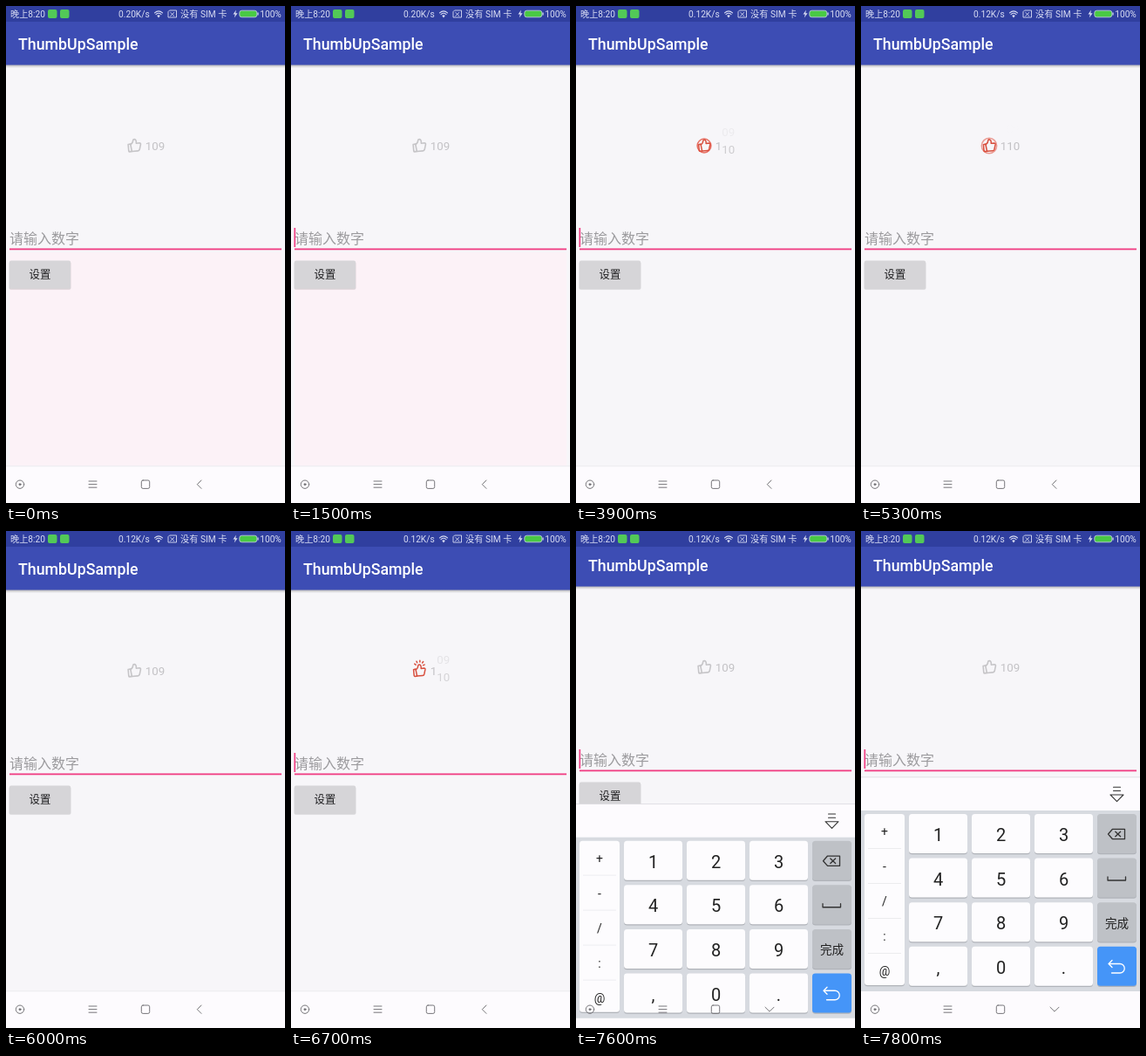
Write an HTML page that moves like this. It is 320 px wide and 569 px high and loops after 8 s.

```html
<!DOCTYPE html>
<html lang="zh">
<head>
<meta charset="utf-8">
<style>
  html, body { margin: 0; width: 100%; height: 100%; overflow: hidden; background: #f7f6f9; }
  svg { display: block; width: 100%; height: 100%; }
  text { font-family: Roboto, "Noto Sans CJK SC", "Noto Sans CJK", sans-serif; }
  .line { fill: none; stroke-linecap: round; stroke-linejoin: round; }
  .mid { text-anchor: middle; }
</style>
</head>
<body>
<svg viewBox="0 0 320 569">
  <defs>
    <linearGradient id="shade" x2="0" y2="1">
      <stop stop-color="#000" stop-opacity=".28"/>
      <stop offset="1" stop-color="#000" stop-opacity="0"/>
    </linearGradient>
    <clipPath id="ringClip"><circle id="clipDisc" cx="147" cy="160" r="9"/></clipPath>
    <g id="hand">
      <path d="M-6.9-1.4L-4.3-2.1L-2.6 6.4L-5 6.9Q-6 7-6.2 6Z"/>
      <path d="M-4.2-1.5Q-1.4-3-1.4-6Q-1.2-7.6.4-7.4Q2.7-7 2.3-2.8L6-3.2Q7.7-3.1 7.4-1.4L6.2 4.3Q5.8 5.8 4.3 5.9L-2.7 6.5"/>
    </g>
  </defs>

  <rect width="320" height="569" fill="#f7f6f9"/>
  <rect id="tint" x="4" y="282" width="312" height="244" fill="#fcf2f7"/>

  <g id="app">
    <rect y="67" width="320" height="4" fill="url(#shade)"/>
    <rect y="10" width="320" height="57.5" fill="#3d4db4"/>
    <text x="14" y="49.5" font-size="17.8" font-weight="500" fill="#fff">ThumbUpSample</text>

    <g id="thumb" class="line" stroke-width="1.6">
      <use href="#hand"/>
      <path id="rays" d="M-5.6-8.4L-4.2-7.3M-3.3-11.6L-2.5-9.9M.9-12.6V-10.7M5-11.2L3.9-9.6M6.6-7.4L5-6.8"/>
    </g>
    <circle id="ring" class="line" cx="147" cy="160" stroke="#e24d3d" stroke-width="1.5"/>
    <g font-size="13.3" fill="#c3c2c5">
      <text x="159.7" y="165">1</text>
      <text id="low" x="167.2">09</text>
      <text id="high" x="167.2">10</text>
    </g>

    <text x="4" y="272" font-size="16" fill="#9c9b9e">请输入数字</text>
    <rect x="4" y="277.5" width="312" height="1.8" fill="#f03c82"/>
    <rect id="cursor" x="3.5" y="254" width="1.7" height="22" fill="#f03c82"/>

    <rect x="3.5" y="292.5" width="71" height="32.3" rx="2" fill="#000" opacity=".13"/>
    <rect x="4" y="291.5" width="70" height="32" rx="1.6" fill="#d6d5d8"/>
    <text class="mid" x="39" y="311.8" font-size="12.4" fill="#1c1c1e">设置</text>
  </g>

  <rect width="320" height="18" fill="#303f9f"/>
  <g font-size="10.2" fill="#d9ddf3">
    <text x="5" y="12.8">晚上8:20</text>
    <rect x="48" y="4" width="10.5" height="10" rx="2" fill="#52c957"/>
    <rect x="62" y="4" width="10.5" height="10" rx="2" fill="#52c957"/>
    <text id="speed" x="129" y="12.8"></text>
    <path d="M175 13.4L173.2 11Q175 9.6 176.8 11Z"/>
    <g class="line" stroke="#d9ddf3">
      <path d="M170.5 7.8Q175 4 179.5 7.8M172 9.6Q175 7 178 9.6" stroke-width="1.1"/>
      <path d="M188 5H195.5V13H186V7ZM188.7 7.5L192.7 11.3M192.7 7.5L188.7 11.3" stroke-width=".9"/>
    </g>
    <text x="200" y="12.8">没有 SIM 卡</text>
    <path d="M264 4.5L260.5 9.6H262.8L261.8 13.4L265.6 8.2H263.2Z"/>
    <rect x="267.8" y="5.2" width="20" height="7.6" rx="2.6" fill="#49c944" stroke="#c9d3e8" stroke-width=".8"/>
    <rect x="288.4" y="7.5" width="1.2" height="3"/>
    <text x="291.2" y="12.8">100%</text>
  </g>

  <g id="navBack">
    <rect y="527" width="320" height="42" fill="#fdfbfe"/>
    <rect y="526.5" width="320" height=".8" fill="#e9e7eb"/>
  </g>

  <g id="keyboard">
    <rect y="282" width="320" height="38" fill="#fdfbfe"/>
    <rect y="281.5" width="320" height=".8" fill="#dcdbe0"/>
    <rect y="320" width="320" height="207" fill="#d7dae0"/>
    <path class="line" d="M289.5 293.2H297.5M289.5 297.5H297.5M286 302H301L293.5 309.6Z" stroke="#333" stroke-width="1.1"/>
    <g id="keys"></g>
    <g class="line" stroke="#333" stroke-width="1.3">
      <path d="M283.5 347L288.5 341.3H302.5V352.7H288.5ZM291.8 344.2L297.6 349.8M297.6 344.2L291.8 349.8"/>
      <path d="M283 396V400H303.5V396"/>
      <path d="M288 491.5L284 495.5L288 499.5M284.5 495.5H297A5.2 5.2 0 0 1 297 506H287.5" stroke="#fff"/>
    </g>
  </g>
  <rect id="navCover" y="527" width="320" height="42" fill="#fdfbfe"/>

  <g class="line" stroke="#77767a" stroke-width="1">
    <circle cx="16" cy="547.7" r="4.7"/>
    <circle cx="16" cy="547.7" r="1" fill="#77767a"/>
    <path d="M95 544H104M95 547.6H104M95 551.2H104"/>
    <rect x="155.3" y="543" width="9.4" height="9.4" rx="1.8"/>
    <path id="back"/>
  </g>
</svg>

<script>
const $ = id => document.getElementById(id);
const set = (id, attrs) => {
  for (const name in attrs) $(id).setAttribute(name, attrs[name]);
};
const clamp = x => Math.max(0, Math.min(1, x));
const LOOP = 8000, STEP = 100, KEYS_AT = 7380;

// Taps alternate between liking and unliking.
const taps = [2480, 3060, 3725, 4460, 5060, 5560, 6080, 6600];

const label = (x, y, size, s) =>
  `<text class="mid" x="${x}" y="${y}" font-size="${size}" fill="#222">${s}</text>`;
const key = (x, y, w, h, fill) =>
  `<rect x="${x}" y="${y + 1.2}" width="${w}" height="${h}" rx="3.5" fill="#b0b3b9"/>` +
  `<rect x="${x}" y="${y}" width="${w}" height="${h}" rx="3.5" fill="${fill}"/>`;

function buildKeys() {
  let out = key(4, 324, 46, 196, '#fdfcfe');
  [...'+-/:@'].forEach((c, i) => {
    out += label(27, 349 + i * 40, 14, c);
    if (i) out += `<rect x="8" y="${323 + i * 40}" width="38" height=".7" fill="#e6e5e9"/>`;
  });
  [...'123456789,0.'].forEach((c, i) => {
    const x = 55 + i % 3 * 72, y = 324 + Math.floor(i / 3) * 50.6;
    out += key(x, y, 67, 45, '#fdfcfe') + label(x + 33.5, y + 31, 20, c);
  });
  for (let i = 0; i < 4; i++)
    out += key(271, 324 + i * 50.6, 45, 45, i < 3 ? '#bec1c6' : '#4595f8');
  $('keys').innerHTML = out + label(293.5, 453.5, 13.6, '完成');
}

function drawThumb(t) {
  const index = taps.filter(tap => tap <= t).length - 1;
  const liking = index >= 0 && index % 2 === 0;
  const age = index < 0 ? 1e4 : t - taps[index];
  const red = liking ? age >= 150 : age < 150;
  let scale = 1;
  if (age < 150) scale = 1 - .1 * age / 150;
  else if (liking) scale = .9 + .1 * clamp((age - 150) / 150);

  const grow = (age - 150) / 100;
  const ringOn = liking && grow >= 0 && grow <= 1;
  const radius = 7.6 + 1.2 * clamp(grow);
  set('ring', { r: radius, opacity: ringOn ? .9 - .4 * grow : 0 });
  set('clipDisc', { r: ringOn ? radius : 30 });
  $('app').style.setProperty('--none', 0);
  set('thumb', {
    transform: `translate(147 160) scale(${scale})`,
    stroke: red ? '#d8503f' : '#c6c5c8'
  });
  set('rays', { opacity: red && !ringOn ? 1 : 0 });

  const eased = (1 - Math.cos(Math.PI * clamp(age / 250))) / 2;
  const up = liking ? eased : 1 - eased;
  set('low', { y: 165 - 20 * up, opacity: 1 - up });
  set('high', { y: 185 - 20 * up, opacity: up });
}

function drawKeyboard(t) {
  const rise = 1 - (1 - clamp((t - KEYS_AT) / 327)) ** 2;
  const open = t >= KEYS_AT;
  set('keyboard', {
    transform: `translate(0 ${287 * (1 - rise)})`,
    visibility: open ? 'visible' : 'hidden'
  });
  set('navCover', { visibility: rise === 1 ? 'visible' : 'hidden' });
  set('app', { transform: `translate(0 ${-Math.min(4, 5 * rise)})` });
  set('back', { d: open ? 'M217 545.2L222 550.2L227 545.2' : 'M224 543L219.3 547.7L224 552.4' });
}

function draw(now) {
  const t = Math.floor(now % LOOP / STEP) * STEP;
  set('tint', { opacity: t < 2000 ? 1 : 0 });
  set('cursor', { opacity: Math.floor(t / 500) % 2 });
  $('speed').textContent = t < 2200 ? '0.20K/s' : '0.12K/s';
  drawThumb(t);
  drawKeyboard(t);
}

buildKeys();
draw(0);
const start = performance.now();
requestAnimationFrame(function tick() {
  draw(performance.now() - start);
  requestAnimationFrame(tick);
});
</script>
</body>
</html>
```
